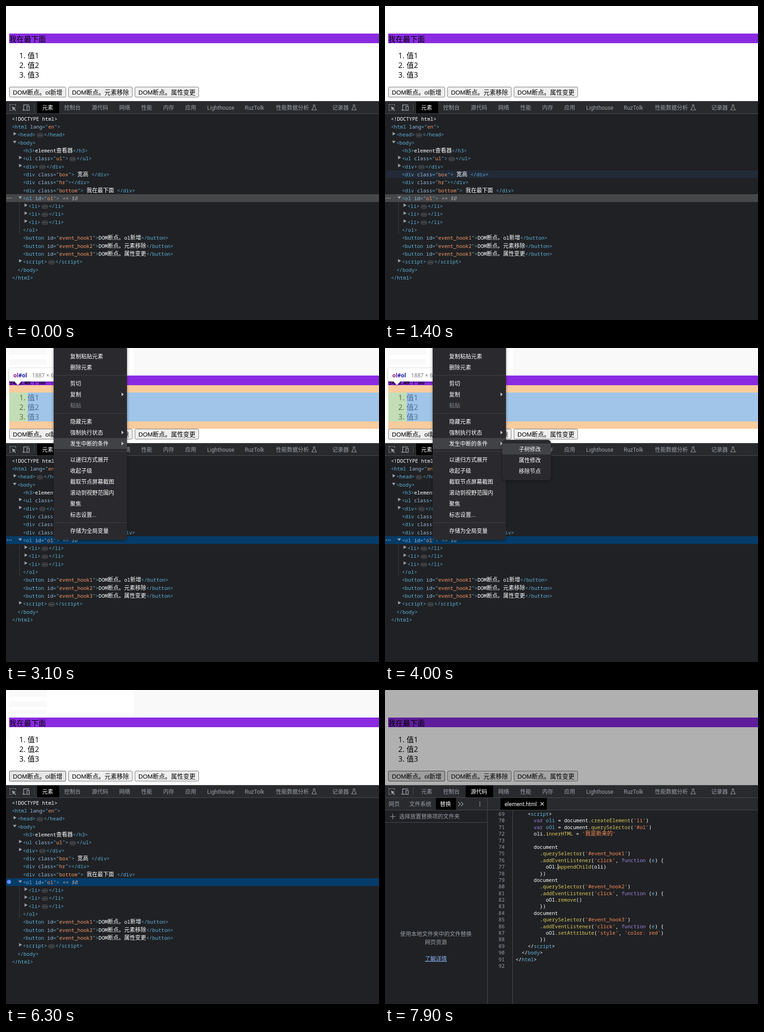
An HTML page that plays this animation: 814x684 px, repeating every 8000 ms.

```html
<!DOCTYPE html>
<html lang="zh-CN">
<head>
<meta charset="utf-8">
<title>DOM breakpoints</title>
<style>
html, body { margin: 0; width: 100%; height: 100%; overflow: hidden; background: #fff; }
svg { display: block; width: 814px; height: 684px; }
text { white-space: pre; }
.ui { font: 12px Roboto, "Noto Sans CJK SC", sans-serif; }
.page { font: 16px "Open Sans", "Noto Sans CJK SC", sans-serif; }
.btn { font: 13.333px "Liberation Sans", "Noto Sans CJK SC", sans-serif; }
.tip { font: 12px "Open Sans", sans-serif; }
.mono { font: 500 11px "Noto Sans Mono", "Noto Sans CJK SC", monospace; fill: #fff; }
.cjk { font-size: 12px; }
.tag { fill: #5db0d7; }
.attr { fill: #9bbbdc; }
.val { fill: #f29766; }
.key { fill: #9a80e0; }
.prop { fill: #d9c85a; }
.str { fill: #fa8d56; }
</style>
</head>
<body>
<svg id="stage" viewBox="0 0 814 684"></svg>
<script>
const LOOP = 8000;
const GREY = '#9aa0a6', LINE = '#494c50', BAR = '#292a2d', DARK = '#202124', LIGHT = '#fff';
const BLUE = 'rgba(111,168,220,.66)', GREEN = 'rgba(147,196,125,.55)', ORANGE = 'rgba(246,178,107,.66)';

const rect = (x, y, w, h, fill, more = '') =>
  `<rect x="${x}" y="${y}" width="${w}" height="${h}" fill="${fill}" ${more}/>`;
const path = (d, fill, more = '') => `<path d="${d}" fill="${fill}" ${more}/>`;
const stroke = (d, color = GREY, w = 1.2, more = '') =>
  path(d, 'none', `stroke="${color}" stroke-width="${w}" ${more}`);
const text = (x, y, s, cls, fill = '', more = '') =>
  `<text x="${x}" y="${y}" class="${cls}" ${fill && `fill="${fill}"`} ${more}>${s}</text>`;
const span = (cls, s) => `<tspan class="${cls}">${s}</tspan>`;
const cjk = s => s.replace(/[\u3000-\u9fff]+/g, m => span('cjk', m));
const esc = s => s.replace(/</g, '&lt;').replace(/>/g, '&gt;');
const layer = (id, s) => `<g id="${id}" opacity="0">${s}</g>`;

// page
const buttons = [[7, 124, 'DOM断点。ol新增'], [136, 140, 'DOM断点。元素移除'], [281, 140, 'DOM断点。属性变更']];
const button = ([x, w, s], fill = '#efefef', edge = '#767676') =>
  rect(x + .5, 176.5, w - 1, 22, fill, `rx="2.5" stroke="${edge}"`) + text(x + 8, 192.5, s, 'btn');

function page() {
  let s = rect(0, 0, 814, 208, '#fff') +
    layer('ghostA', rect(0, 0, 814, 60, '#f9f9f9') + rect(0, 82, 7, 25, '#f9f9f9') +
      rect(3, 19, 160, 37, 'none', 'rx="8" stroke="#fff" stroke-width="7"') +
      text(92, 43, '1887 × 21', 'tip', '#fff')) +
    layer('ghostB', rect(7, 0, 82, 15, '#f9f9f9') + rect(7, 24, 82, 13, '#f9f9f9') +
      rect(7, 44, 82, 8, '#f9f9f9') + rect(279, 0, 535, 60, '#f9f9f9') + rect(0, 82, 7, 25, '#f9f9f9')) +
    rect(7, 60, 807, 21, '#8a2be2') + text(7, 77.5, '我在最下面', 'page');
  for (let i = 1; i < 4; i++) {
    const y = 93 + 21 * i;
    s += text(29, y, i + '.', 'page') + text(47, y, '值' + i, 'page');
  }
  return s + buttons.map(b => button(b)).join('') + layer('press', button(buttons[0], '#e5e5e5', '#4f4f4f'));
}

// element highlights and their labels
function tip(x, y, w, name, rest, size, sizeX, arrow) {
  const tail = arrow ? `M${x + 11} ${y + 28}h16l-8 9z` : '';
  return `<g filter="url(#soft)">${rect(x, y, w, 29, '#fff', 'rx="3"')}${path(tail, '#fff')}</g>` +
    text(x + 9, y + 20, `<tspan fill="#881280">${name}</tspan><tspan fill="#1a1aa6">${rest}</tspan>`,
      'tip', '', 'style="font-weight:bold"') +
    text(sizeX, y + 20, size, 'tip', '#6b6f74');
}
const highlights = () =>
  layer('hlHtml', rect(0, 0, 814, 208, BLUE) + tip(1, 178, 135, 'html', '', '1903 × 858.44', 49)) +
  layer('hlBody', rect(0, 0, 7, 208, ORANGE) + rect(7, 0, 807, 208, BLUE) +
    tip(1, 178, 139, 'body', '', '1887 × 842.44', 53)) +
  layer('hlBottom', rect(7, 60, 807, 21, BLUE) + tip(7, 23, 152, 'div', '.bottom', '1887 × 21', 93, true)) +
  layer('hlOl', rect(7, 81, 807, 16, ORANGE) + rect(7, 160, 807, 16, ORANGE) + rect(7, 97, 40, 63, GREEN) +
    rect(47, 97, 767, 63, BLUE) + tip(7, 44, 114, 'ol', '#ol', '1887 × 63', 57, true)) +
  layer('dim', rect(0, 0, 814, 208, 'rgba(0,0,0,.31)'));

// tool bar
const tabs = [[79, '元素', 24], [127, '控制台', 36], [187, '源代码', 36], [247, '网络', 24], [295, '性能', 24],
  [343, '内存', 24], [391, '应用', 24], [439, 'Lighthouse'], [521, 'RuzTolk'], [589, '性能数据分析'], [712, '记录器']];
const tabOn = (i, fill) => {
  const [x, s, w] = tabs[i];
  return rect(x - 11, 208, w + 24, 26, fill) + text(x, 226, s, 'ui', '#fff');
};
const flask = x => stroke(`M${x + 3} 215.5h5M${x + 4} 216v4l-3.5 6.5h10l-3.5 -6.5v-4`, GREY, 1.1);
const toolBar = () =>
  rect(0, 207, 814, 28, BAR) + rect(0, 207, 814, 1, LINE) + rect(0, 234, 814, 1, LINE) +
  stroke('M8.6 215v12.5M8 214.7h13.5M21.2 215v4M8 227.4h5', GREY, 1.2, 'stroke-dasharray="2 1.6"') +
  path('M13 219l8.5 3 -3.4 1.5 3.6 3.8 -1.4 1.3 -3.7 -3.7 -1.4 3z', GREY) +
  stroke('M39 226.5h-3M38.5 226v-10.5h12M36 227h8', GREY, 1.5) +
  rect(45.7, 218.7, 5, 8.6, 'none', `stroke="${GREY}" stroke-width="1.4"`) +
  rect(61, 213, 1, 16, LINE) +
  tabs.map(([x, s]) => text(x, 226, s, 'ui', GREY)).join('') + flask(667) + flask(754) +
  layer('tabTree', tabOn(0, '#000')) + layer('tabCode', tabOn(2, '#000')) +
  layer('overPerf', tabOn(4, '#35363a')) + layer('overConsole', tabOn(1, '#35363a'));

// element tree: indent, arrow, markup ("~" marks folded content)
const li = [49, '>', '<li>~</li>'];
const rows = [
  [13, '', '<!DOCTYPE html>'], [13, '', '<html lang="en">'], [25, '>', '<head>~</head>'], [25, 'v', '<body>'],
  [37, '', '<h3>element查看器</h3>'], [37, '>', '<ul class="ul">~</ul>'], [37, '>', '<div>~</div>'],
  [37, '', '<div class="box"> 宽高 </div>'], [37, '', '<div class="hr"></div>'],
  [37, '', '<div class="bottom"> 我在最下面 </div>'], [37, 'v', '<ol id="ol">'], li, li, li, [37, '', '</ol>'],
  [37, '', '<button id="event_hook1">DOM断点。ol新增</button>'],
  [37, '', '<button id="event_hook2">DOM断点。元素移除</button>'],
  [37, '', '<button id="event_hook3">DOM断点。属性变更</button>'],
  [37, '>', '<script>~<\/script>'], [25, '', '</body>'], [13, '', '</html>']];
const rowY = i => 245.8 + 17.3 * i;
const rowBar = (i, fill, x = 0) => rect(x, Math.round(rowY(i) - 8.7), 814 - x, 17, fill);

const markup = s => cjk(s.replace(/<(\/?\w+)(?: (\w+)="(\w+)")?>/g, (m, name, attr, val) =>
  span('tag', '&lt;' + name) +
  (attr ? span('attr', ' ' + attr) + span('tag', '="') + span('val', val) + span('tag', '"') : '') +
  span('tag', '&gt;')).replace('<!', '&lt;!'));

function treeRow([x, arrow, s], i) {
  const y = rowY(i), base = Math.round(y + 4), [head, tail] = s.split('~');
  let out = text(x, base, markup(head), 'mono');
  if (arrow === '>') out += path(`M${x - 8.5} ${y - 6}l6.5 3.8 -6.5 3.8z`, GREY);
  if (arrow === 'v') out += path(`M${x - 10} ${y - 4}h8l-4 5.5z`, GREY);
  if (tail) {
    const end = x + head.length * 6.6;
    out += rect(end + 3, y - 2.8, 13, 8, '#2c2d30', 'rx="4" stroke="#5f6368" stroke-width=".8"');
    for (const d of [6.3, 9.5, 12.7]) out += rect(end + d - .7, y + .5, 1.4, 1.4, GREY);
    out += text(end + 18, base, markup(tail), 'mono');
  }
  return out;
}
const tree = () =>
  rowBar(10, '#464749') + layer('rowBlue', rowBar(10, '#063c69')) +
  [0, 1, 3, 5, 7, 9].map(i => layer('row' + i, rowBar(i, '#222a37', 2))).join('') +
  rect(29, 428, 1, 69, '#3c4043') + rows.map(treeRow).join('') +
  text(122.8, Math.round(rowY(10) + 4), '== $0', 'mono', '', 'style="fill:#a5a9ae;font-style:italic"') +
  layer('more', [2, 6, 10].map(x => rect(x, 417.5, 2, 2, GREY)).join('')) +
  layer('dot', '<circle cx="6.5" cy="418" r="4.6" fill="#5a8bf5"/>');

// sources panel
const code = `    <script>
      var oli = document.createElement('li')
      var oOl = document.querySelector('#ol')
      oli.innerHTML = '我是新来的'

      document
        .querySelector('#event_hook1')
        .addEventListener('click', function (e) {
          oOl.appendChild(oli)
        })
      document
        .querySelector('#event_hook2')
        .addEventListener('click', function (e) {
          oOl.remove()
        })
      document
        .querySelector('#event_hook3')
        .addEventListener('click', function (e) {
          oOl.setAttribute('style', 'color: red')
        })
    <\/script>
  </body>
</html>
`.split('\n');
const paint = s => cjk(esc(s).replace(
  /('[^']*')|\b(var|function)\b|(?<=\.)(\w+)|((?<=var )\w+|(?<=\()e(?=\))|(?<=&lt;\/?)\w+)/g,
  (m, str, key, prop) => span(str ? 'str' : key ? 'key' : prop ? 'prop' : 'tag', m)));

function sources() {
  const mid = 'text-anchor="middle"';
  const frame = rect(0, 235, 814, 449, DARK) + rect(0, 235, 814, 26, BAR) + rect(0, 261, 814, 1, LINE) +
    rect(0, 288, 223, 1, LINE) + rect(223, 235, 1, 449, LINE) +
    rect(278, 262, 1, 422, LINE) + rect(111, 235, 44, 26, '#000') + rect(252, 235, 101, 26, '#000') +
    text(8, 253, '网页', 'ui', GREY) + text(53, 253, '文件系统', 'ui', GREY) + text(120, 253, '替换', 'ui', '#fff') +
    stroke('M160 244l4.5 4.5 -4.5 4.5M166 244l4.5 4.5 -4.5 4.5') +
    [243, 247, 251].map(y => rect(206, y, 2, 2, GREY)).join('') +
    text(261, 253, 'element.html', 'ui', '#fff') + stroke('M339.5 244.5l7 7M346.5 244.5l-7 7', LIGHT, 1.1) +
    stroke('M11 275.5h12M17 269.5v12') + text(31, 280, '选择放置替换项的文件夹', 'ui', GREY) +
    text(111, 535.5, '使用本地文件夹中的文件替换', 'ui', GREY, mid) + text(111, 553.5, '网页资源', 'ui', GREY, mid) +
    text(111, 589.5, '了解详情', 'ui', '#8ab4f8', mid + ' text-decoration="underline"');
  const lines = code.map((s, i) => {
    const y = Math.round(274 + 14.39 * i);
    return text(261, y, 69 + i, 'mono', '', 'style="fill:#9aa0a6" text-anchor="end"') + text(285, y, paint(s), 'mono');
  }).join('');
  return layer('panel', frame) + layer('lines', lines) + layer('caret', rect(377, 379, 1, 13, '#fff'));
}

// context menus
const items = [[18, '复制粘贴元素'], [42, '删除元素'], [77, '剪切'], [101, '复制', 1], [125, '粘贴'], [160, '隐藏元素'],
  [184, '强制执行状态', 1], [208, '发生中断的条件', 1], [243, '以递归方式展开'], [267, '收起子级'],
  [291, '截取节点屏幕截图'], [315, '滚动到视野范围内'], [339, '聚焦'], [363, '标志设置...'], [398, '存储为全局变量']];
const menu = () => layer('menu',
  rect(104, -20, 160, 438, BAR, 'rx="7" filter="url(#deep)"') +
  [315, 267, 208].map(y => layer('item' + y, rect(104, y - 12, 160, 24, '#414246'))).join('') +
  [59, 142, 225, 380].map(y => rect(104, y, 160, 1, '#424347')).join('') +
  items.map(([y, s, sub]) => text(140, y + 4.7, s, 'ui', s === '粘贴' ? '#80868b' : LIGHT) +
    (sub ? path(`M252 ${y - 4}l5 4 -5 4z`, '#bdc1c6') : '')).join('') +
  layer('sub', rect(256, 200, 106, 88, BAR, 'rx="7" filter="url(#deep)"') +
    layer('subOver', rect(256, 208, 106, 24, '#414246')) +
    ['子树修改', '属性修改', '移除节点'].map((s, i) => text(292, 224.7 + 24 * i, s, 'ui', LIGHT)).join('')));

const shadow = (id, dy, blur, alpha) =>
  `<filter id="${id}" x="-20%" y="-50%" width="140%" height="200%"><feDropShadow dx="0" dy="${dy}" stdDeviation="${blur}" flood-opacity="${alpha}"/></filter>`;

document.getElementById('stage').innerHTML =
  `<defs>${shadow('soft', 1, 2, .35)}${shadow('deep', 2, 3, .4)}</defs>` +
  page() + highlights() + rect(0, 207, 814, 477, DARK) + tree() + sources() + toolBar() + menu();

// when each layer shows: [from, to, opacity]
const shows = {
  hlHtml: [[1100, 1200]], row1: [[1100, 1200]],
  hlBody: [[1200, 1300]], row3: [[1200, 1300]],
  row5: [[1300, 1400]], row7: [[1400, 1500]],
  hlBottom: [[1500, 2200]], row9: [[1500, 2200]],
  hlOl: [[2200, 4800]], rowBlue: [[2200, LOOP]],
  ghostA: [[2200, 2300]], ghostB: [[2300, 7600]],
  menu: [[2300, 2400, .4], [2400, 2500, .8], [2500, 4700], [4700, 4800, .4]],
  item315: [[2900, 3000]], item267: [[3000, 3100]], item208: [[3100, 4800]],
  sub: [[3500, 3600, .5], [3600, 4800]], subOver: [[4000, 4800]],
  more: [[0, 4800]], dot: [[4800, LOOP]],
  overPerf: [[4800, 5900]], row0: [[5900, 6000]], overConsole: [[6000, 6100]],
  press: [[6300, LOOP]], dim: [[7600, LOOP]],
  tabTree: [[0, 7700]], tabCode: [[7700, LOOP]],
  panel: [[7700, LOOP]], lines: [[7800, LOOP]], caret: [[7900, LOOP]]
};
const layers = Object.entries(shows).map(([id, spans]) => [document.getElementById(id), spans]);
const start = performance.now();

function draw() {
  const t = (performance.now() - start) % LOOP;
  for (const [el, spans] of layers) {
    const hit = spans.find(([a, b]) => t >= a && t < b);
    el.setAttribute('opacity', hit ? hit[2] ?? 1 : 0);
  }
  requestAnimationFrame(draw);
}
draw();
</script>
</body>
</html>
```
